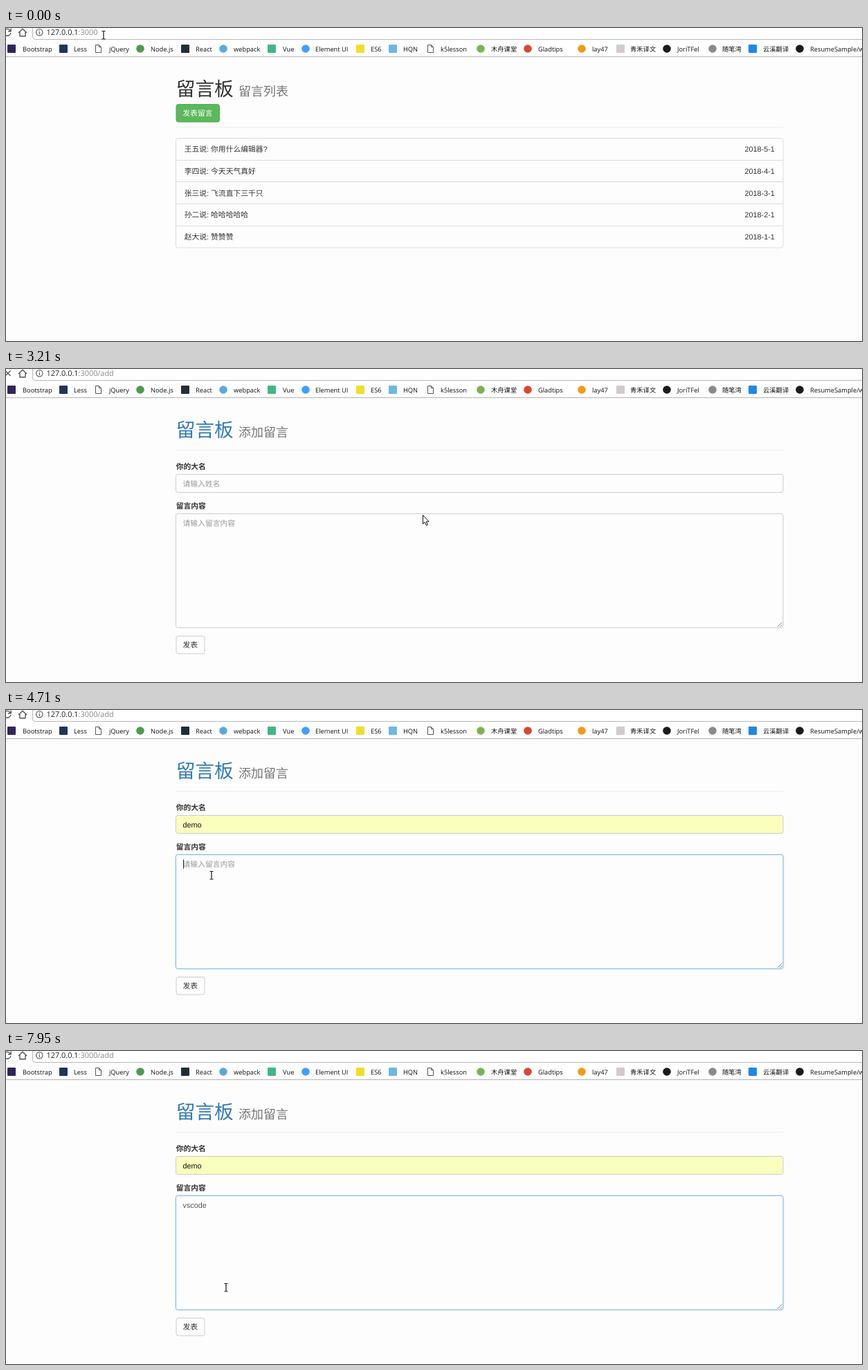
An HTML page that plays this animation: 1237 by 453 pixels, repeating every 8 s.

```html
<!DOCTYPE html>
<html lang="zh">
<head>
<meta charset="utf-8">
<title>留言板</title>
<style>
html, body { margin: 0; width: 100%; height: 100%; overflow: hidden; background: #fff; }
svg { display: block; }
text { font: 10.8px "Liberation Sans", "Noto Sans CJK SC", "Noto Sans CJK", sans-serif; fill: #333; white-space: pre; text-rendering: geometricPrecision; }
.mark { font: 9.3px "Open Sans", "Noto Sans CJK SC", "Noto Sans CJK", sans-serif; fill: #111; }
.url { font: 10.9px "Open Sans", sans-serif; fill: #222; }
.h1 { font-size: 27.7px; }
.small { font-size: 18px; fill: #777; }
.bold { font-weight: 700; }
.hint { fill: #999; }
.ime { font-size: 10px; }
.line { fill: none; stroke: #ddd; }
.icon { fill: none; stroke: #555; stroke-width: 1.4; }
.field { fill: #fdfdfd; stroke: #ccc; }
.focus { stroke: #7abbee; filter: drop-shadow(0 0 1.2px rgba(102,175,233,.45)); }
.caret { stroke: #222; }
</style>
</head>
<body>
<script>
const NS = 'http://www.w3.org/2000/svg';
const LOOP = 8000;
const PAGE = '#fdfdfd';

function make(parent, tag, attrs = {}, content = '') {
  const el = document.createElementNS(NS, tag);
  for (const key in attrs) el.setAttribute(key, attrs[key]);
  el.textContent = content;
  parent.append(el);
  return el;
}
const group = parent => make(parent, 'g');
const text = (p, x, y, s, cls = '', more = {}) => make(p, 'text', { x, y, class: cls, ...more }, s);
const rect = (p, x, y, width, height, more = {}) => make(p, 'rect', { x, y, width, height, ...more });
const path = (p, d, cls, more = {}) => make(p, 'path', { d, class: cls, ...more });
const show = (el, on) => el.setAttribute('display', on ? 'inline' : 'none');

const svg = make(document.body, 'svg', { width: 1237, height: 453, viewBox: '0 0 1237 453' });

// Browser bar
const bar = group(svg);
rect(bar, 0, 42, 1237, 411, { fill: PAGE });
path(bar, 'M0 41.5H1237', 'line', { style: 'stroke:#b4b4b4' });
path(bar, 'M38.5 0V13Q38.5 16.5 42 16.5H1237', 'line', { style: 'stroke:#b8b8b8' });
const reload = path(bar, 'M0 1.8A4.6 4.6 0 0 1 6 4.2M6.8 7A4.6 4.6 0 0 1 0 10.6M7.2 .5V4.8H3', 'icon');
const stop = path(bar, 'M-1 2.5L6.5 10M6.5 2.5L-1 10', 'icon');
path(bar, 'M18 7L24 1.2L30 7M20 6V11.8H28V6', 'icon');
make(bar, 'circle', { cx: 48.3, cy: 6.2, r: 4.7, class: 'icon', style: 'stroke-width:1.1' });
path(bar, 'M48.3 5.5V9M48.3 3.2V4.5', 'icon', { style: 'stroke-width:1.2' });
const selection = rect(bar, 58, 0, 75, 13, { fill: '#3297fd' });
const url = text(bar, 58.5, 10, '', 'url');
const host = make(url, 'tspan', {}, '127.0.0.1');
const route = make(url, 'tspan');

// [icon shape, colour, icon x, label x, label]
const bookmarks = [
  ['square', '#33255a', 2, 24, 'Bootstrap'],
  ['square', '#1d365d', 77, 98, 'Less'],
  ['page', '', 129, 149, 'jQuery'],
  ['circle', '#4f9a50', 188, 209, 'Node.js'],
  ['square', '#20303a', 253, 274, 'React'],
  ['circle', '#5aa9de', 308, 329, 'webpack'],
  ['square', '#41b883', 378, 400, 'Vue'],
  ['circle', '#409eff', 427, 447, 'Element UI'],
  ['square', '#f2dc2b', 506, 527, 'ES6'],
  ['square', '#6bb9e3', 553, 574, 'HQN'],
  ['page', '', 609, 628, 'k5lesson'],
  ['circle', '#78b551', 680, 701, '木舟课堂'],
  ['circle', '#d8482f', 748, 769, 'Gladtips'],
  ['circle', '#f39a13', 826, 847, 'lay47'],
  ['square', '#d3caca', 882, 902, '青禾译文'],
  ['circle', '#1b1b1b', 949, 970, 'JoriTFel'],
  ['circle', '#8a8a8a', 1015, 1035, '随笔湾'],
  ['square', '#1e88e8', 1073, 1094, '云溪翻译'],
  ['circle', '#1b1b1b', 1141, 1162, 'ResumeSample/w'],
];
for (const [shape, fill, x, labelX, label] of bookmarks) {
  if (shape === 'square') rect(bar, x, 24, 12, 12, { fill, rx: 1 });
  if (shape === 'circle') make(bar, 'circle', { cx: x + 6, cy: 30, r: 5.8, fill });
  if (shape === 'page') path(bar, `M${x + .5} 24.5h5l3 3v8h-8zM${x + 5.5} 24.5v3h3`, 'icon', { style: 'stroke-width:1' });
  text(bar, labelX, 33.6, label, 'mark');
}

// Message list
const list = group(svg);
text(list, 245.7, 98.3, '留言板', 'h1');
text(list, 336, 98, '留言列表', 'small');
const button = rect(list, 246, 110.5, 62.5, 25.5, { rx: 3 });
text(list, 255.3, 127.2, '发表留言', '', { style: 'fill:#fff' });
path(list, 'M246 143.5H1123', 'line', { style: 'stroke:#eee' });
rect(list, 245.5, 159.5, 877.5, 158.5, { rx: 3, class: 'line' });
['王五说: 你用什么编辑器?', '李四说: 今天天气真好', '张三说: 飞流直下三千只', '孙二说: 哈哈哈哈哈', '赵大说: 赞赞赞'].forEach((line, i) => {
  const y = 179.4 + i * 31.65;
  text(list, 257.7, y, line);
  text(list, 1110.8, y, `2018-${5 - i}-1`, '', { 'text-anchor': 'end' });
  if (i) path(list, `M246 ${Math.round(159 + i * 31.7) + .5}H1123`, 'line');
});

// Message form
const form = group(svg);
text(form, 245.7, 98.3, '留言板', 'h1', { style: 'fill:#337ab7' });
text(form, 336, 98, '添加留言', 'small');
path(form, 'M246 117.5H1123', 'line', { style: 'stroke:#eee' });
text(form, 245.7, 145, '你的大名', 'bold');
const nameBox = rect(form, 245.5, 152.5, 877.5, 26, { rx: 3 });
const nameText = text(form, 255.5, 170, '');
text(form, 245.7, 202, '留言内容', 'bold');
const noteBox = rect(form, 245.5, 209.5, 877.5, 165, { rx: 3 });
path(form, 'M1115 373L1121.5 366.5M1119 373L1121.5 370.5', 'line', { style: 'stroke:#888' });
const noteText = text(form, 255.5, 227, '');
const underline = path(form, '', 'caret', { style: 'stroke:#555' });
const caret = path(form, '', 'caret');
rect(form, 246, 386.5, 41, 25.5, { rx: 3, class: 'field' });
text(form, 255.5, 403.2, '发表');
const menu = group(form);
const menuBox = rect(menu, 245.5, 179.5, 879, 19, { stroke: '#222' });
text(menu, 253, 193, 'demo', 'bold', { style: 'fill:#000' });

// Input method window
const ime = group(form);
const imeBox = rect(ime, 262.5, 233.5, 100, 26, { fill: '#fff', stroke: '#ccc' });
const imeTop = text(ime, 269, 0, '', 'ime');
const imeLow = text(ime, 269, 281, '1.数字   2.日期   3.算式   4.函数', 'ime');

// Pointers
const pointers = { arrow: group(svg), beam: group(svg), hand: group(svg) };
path(pointers.arrow, 'M.5 .5V13.2L3.3 10.6L5.4 15.5L7.4 14.6L5.3 9.9H9.3Z', '', { fill: '#fff', stroke: '#111' });
path(pointers.beam, 'M-2.5 -5.5H-1L0 -5L1 -5.5H2.5M0 -5V5.5M-2.5 6H-1L0 5.5L1 6H2.5', '', { fill: 'none', stroke: '#111', 'stroke-width': 1.2 });
path(pointers.hand, 'M-1.5 8V1Q0 -1 1.5 1V6Q3 5 4.2 6.5Q6 5.5 7 7.3Q9 7 9 9V12L7.5 16H0L-4 10Q-4.5 8 -3 8L-1.5 10Z', '', { fill: '#fff', stroke: '#111' });

// [time, pointer, x, y]
const moves = [
  [0, 'beam', 141, 10], [900, 'beam', 64, 13], [1040, 'beam', 18, 20], [1170, 'arrow', 31, 29],
  [1310, 'arrow', 98, 134], [1460, 'arrow', 99, 142], [1590, 'arrow', 99, 144],
  [1740, 'hand', 285, 117], [2120, 'arrow', 423, 250], [2250, 'arrow', 370, 190],
  [2370, 'arrow', 301, 117], [2520, 'arrow', 818, 216], [2640, 'arrow', 370, 115],
  [2790, 'arrow', 338, 115], [2930, 'hand', 298, 119], [3060, 'hand', 284, 124],
  [3210, 'arrow', 602, 211], [3340, 'arrow', 173, 142], [3480, 'arrow', 225, 150],
  [3610, 'beam', 266, 165], [3760, 'beam', 282, 168], [4160, 'arrow', 285, 185],
  [4440, 'arrow', 288, 206], [4570, 'beam', 297, 239], [5870, 'arrow', 297, 238],
  [7820, 'beam', 309, 300], [7950, 'beam', 318, 342],
];
// [time, typed text, input window width]
const typing = [
  [0, '', 0], [5870, 'v', 443], [6120, 'v', 0], [6250, 'vs', 108], [6500, 'vsc', 113],
  [6780, 'vsco', 118], [6930, 'vscod', 144], [7310, 'vscode', 0],
];

const latest = (rows, t) => rows.findLast(row => row[0] <= t);
const within = (t, from, to) => t >= from && t < to;

function drawList(t) {
  const hover = within(t, 1740, 2120) || t >= 2930;
  button.setAttribute('fill', hover ? '#449d44' : '#5cb85c');
  button.setAttribute('stroke', hover ? '#398439' : '#4cae4c');
}

function drawForm(t) {
  const filled = t >= 4160;
  nameBox.setAttribute('class', within(t, 3900, 4710) ? 'field focus' : 'field');
  nameBox.style.fill = filled ? '#faffbd' : PAGE;
  nameText.textContent = filled ? 'demo' : '请输入姓名';
  nameText.style.fill = filled ? '#111' : '#999';
  show(menu, within(t, 4030, 4440));
  menuBox.setAttribute('fill', filled ? '#bedcf7' : '#fff');

  const [, typed, width] = latest(typing, t);
  noteBox.setAttribute('class', t >= 4710 ? 'field focus' : 'field');
  noteText.textContent = typed || '请输入留言内容';
  noteText.style.fill = typed ? '#555' : '#999';
  const end = 256 + (typed ? noteText.getComputedTextLength() : 0);
  underline.setAttribute('d', `M255.5 229.5H${end}`);
  show(underline, within(t, 5870, 7310));

  const inName = t < 4710;
  const top = inName ? 159.5 : 216.5;
  const caretX = inName ? 255.5 : Math.floor(end) + .5;
  caret.setAttribute('d', `M${caretX} ${top}v13`);
  show(caret, within(t, 3900, 5100) || within(t, 5720, 7820));

  const tall = width > 200;
  show(ime, width > 0);
  imeBox.setAttribute('width', width);
  imeBox.setAttribute('y', tall ? 239.5 : 233.5);
  imeBox.setAttribute('height', tall ? 53 : 26);
  imeTop.setAttribute('y', tall ? 257 : 250);
  imeTop.textContent = tall ? typed : `1.${typed}`;
  show(imeLow, tall);
}

function draw(t) {
  const onForm = t >= 3210;
  const loading = within(t, 3210, 3340);
  show(list, !onForm);
  show(form, onForm);
  show(stop, loading);
  show(reload, !loading);

  const selected = within(t, 900, 1460);
  const all = t >= 1040;
  show(selection, selected);
  selection.setAttribute('x', all ? 58 : 64.5);
  selection.setAttribute('width', all ? 75 : 68.5);
  host.style.fill = selected && all ? '#fff' : '#222';
  route.style.fill = selected ? '#fff' : '#888';
  route.textContent = onForm ? ':3000/add' : ':3000';

  if (onForm) drawForm(t);
  else drawList(t);

  const [, kind, x, y] = latest(moves, t);
  for (const name in pointers) show(pointers[name], name === kind);
  pointers[kind].setAttribute('transform', `translate(${x} ${y})`);
}

const start = performance.now();
function tick() {
  draw((performance.now() - start) % LOOP);
  requestAnimationFrame(tick);
}
tick();
</script>
</body>
</html>
```
